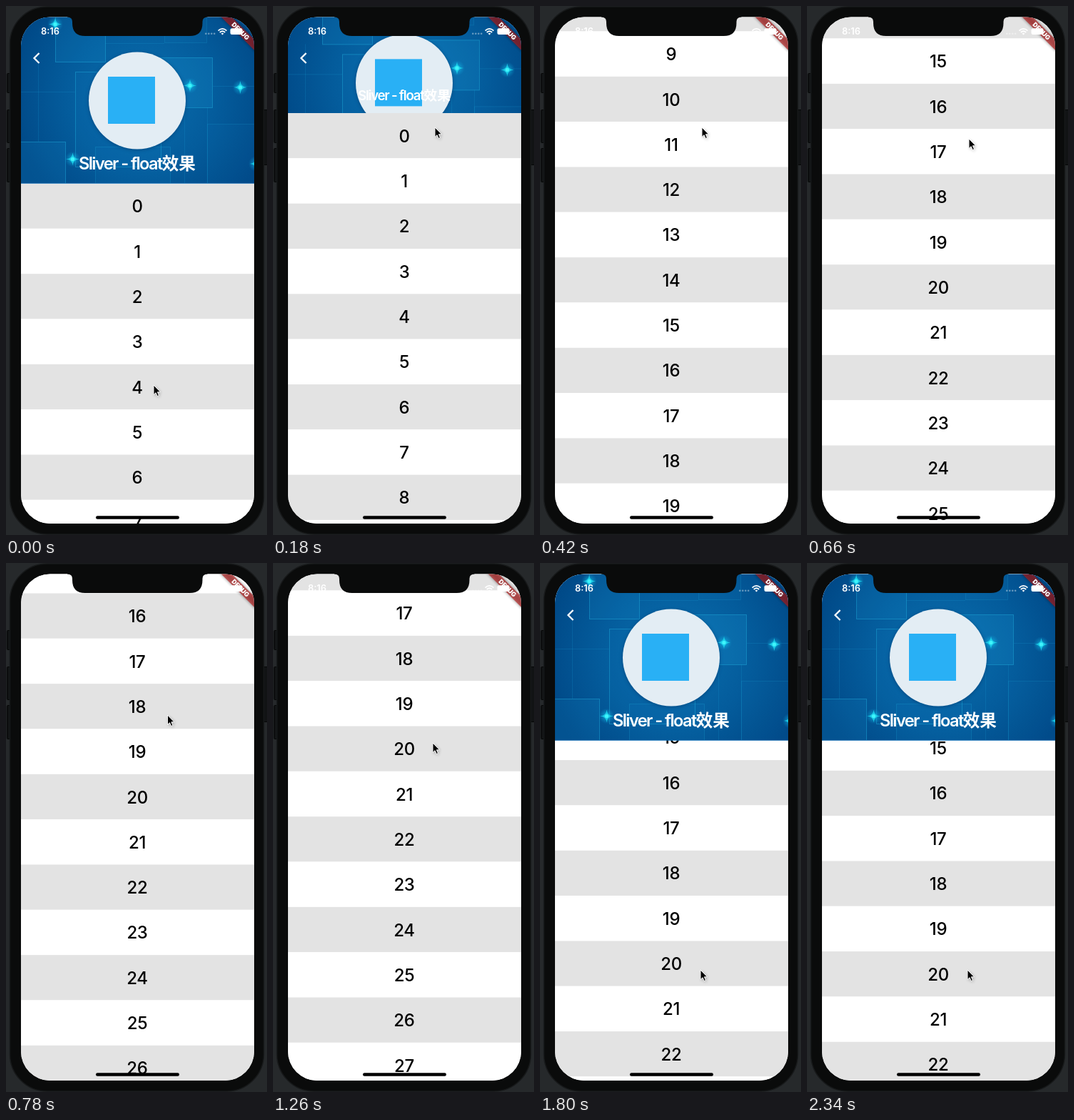
Recreate the animation shown at these times as an HTML page. Size 366 by 741 pixels, loop 2.4 s.

```html
<!DOCTYPE html>
<html lang="zh">
<head>
<meta charset="utf-8">
<title>Sliver float</title>
<style>
  html, body { margin: 0; width: 100%; height: 100%; overflow: hidden; background: #26292b; }
  svg { display: block; width: 366px; height: 741px; }
  text { font-family: Inter, "Noto Sans CJK SC", "Noto Sans CJK", sans-serif; text-anchor: middle; }
  .num { font-size: 24px; font-weight: 500; letter-spacing: -.3px; fill: #000; }
  .title { font-size: 23.6px; font-weight: 600; fill: #fff; }
  .latin { letter-spacing: -1.6px; }
  .clock { font-size: 12.8px; font-weight: 600; fill: #fff; }
  .debug { font-size: 8.9px; font-weight: 900; fill: #fff; }
</style>
</head>
<body>
<svg viewBox="0 0 366 741">
  <defs>
    <clipPath id="screen"><rect x="21" y="15.5" width="327" height="709.5" rx="41"/></clipPath>
    <clipPath id="barClip"><rect id="barRect" x="20" y="15.5" width="329" height="233"/></clipPath>
    <radialGradient id="sky" gradientUnits="userSpaceOnUse" cx="190" cy="125" r="190">
      <stop offset="0" stop-color="#0a6fae"/>
      <stop offset=".55" stop-color="#045c9c"/>
      <stop offset="1" stop-color="#004886"/>
    </radialGradient>
    <radialGradient id="glow">
      <stop offset="0" stop-color="#35f4ff" stop-opacity=".9"/>
      <stop offset=".35" stop-color="#10c8ee" stop-opacity=".45"/>
      <stop offset="1" stop-color="#10a8e0" stop-opacity="0"/>
    </radialGradient>
    <filter id="soft" x="-30%" y="-30%" width="160%" height="160%"><feGaussianBlur stdDeviation="2"/></filter>
    <g id="spark">
      <circle r="11" fill="url(#glow)"/>
      <path d="M0-9Q.6-.6 9 0Q.6.6 0 9Q-.6.6-9 0Q-.6-.6 0-9Z" fill="#1fdcf2" opacity=".8"/>
      <circle r="2.6" fill="#3ff4fb"/>
    </g>
  </defs>

  <!-- phone body -->
  <g fill="#111314" stroke="#050606">
    <rect x="1.5" y="94.5" width="8" height="27" rx="1"/>
    <rect x="1.5" y="145.5" width="8" height="46" rx="1"/>
    <rect x="1.5" y="199.5" width="8" height="47" rx="1"/>
    <rect x="357.5" y="145.5" width="10" height="77" rx="1"/>
  </g>
  <rect x="5.5" y="1" width="356" height="739" rx="52" fill="#0a0b0b" stroke="#17191a" stroke-width="1.5"/>

  <g clip-path="url(#screen)">
    <rect x="20" y="15" width="329" height="711" fill="#fff"/>
    <g id="list"></g>

    <g id="bar">
      <g clip-path="url(#barClip)">
        <rect x="20" y="15" width="329" height="234" fill="#2196f3"/>
        <g id="photo">
          <rect x="20" y="15" width="329" height="234" fill="url(#sky)"/>
          <g fill="#1c9ad6" fill-opacity=".13" stroke="#1fa6d8" stroke-opacity=".5">
            <rect x="69.5" y="5.5" width="70" height="73"/>
            <rect x="97.5" y="92.5" width="120" height="133" fill-opacity=".06"/>
            <rect x="214.5" y="72.5" width="75" height="70" fill-opacity=".2"/>
            <rect x="10.5" y="190.5" width="73" height="70"/>
            <rect x="222.5" y="5.5" width="59" height="46" fill-opacity=".05" stroke-opacity=".2"/>
            <rect x="282.5" y="165.5" width="80" height="90" fill-opacity=".04" stroke-opacity=".2"/>
            <rect x="125.5" y="197.5" width="105" height="60" fill-opacity=".06" stroke-opacity=".25"/>
          </g>
          <path d="M20 120.5H97M139 52.5H222M290 112.5H349M282.5 142V249M45.5 78V190M250.5 142V249M84 214.5H125" fill="none" stroke="#1ba0d4" stroke-opacity=".2"/>
          <use href="#spark" x="69" y="25.5"/>
          <use href="#spark" x="258" y="111.5"/>
          <use href="#spark" x="328.5" y="114"/>
          <use href="#spark" x="93.5" y="214.5"/>
          <use href="#spark" x="351" y="221"/>
          <circle cx="184" cy="133.5" r="69" fill="#003a70" opacity=".5" filter="url(#soft)"/>
          <circle cx="184" cy="132.5" r="68" fill="#e3edf4"/>
          <rect x="143" y="99" width="66" height="66" fill="#29b0f5"/>
        </g>
        <g id="title"><text class="title" y="-8"><tspan class="latin">Sliver - float</tspan><tspan>效果</tspan></text></g>
        <path d="M46.5 66L39.5 73L46.5 80" fill="none" stroke="#fff" stroke-width="2.3"/>
      </g>
    </g>

    <!-- debug ribbon -->
    <g transform="translate(348.5 15.5) rotate(45)">
      <rect x="-36" y="22.5" width="72" height="10.5" fill="#000" opacity=".45" filter="url(#soft)"/>
      <rect x="-36" y="22.5" width="72" height="10.5" fill="#b71c1c" fill-opacity=".63"/>
      <text class="debug" y="31">DEBUG</text>
    </g>

    <!-- status bar -->
    <text class="clock" x="62" y="40.3">8:16</text>
    <g fill="#fff">
      <g opacity=".4">
        <circle cx="280.3" cy="38.7" r="1.3"/><circle cx="284.3" cy="38.7" r="1.3"/>
        <circle cx="288.3" cy="38.7" r="1.3"/><circle cx="292.2" cy="38.7" r="1.3"/>
      </g>
      <g fill="none" stroke="#fff" stroke-width="1.8">
        <path d="M297.6 34.6Q303.5 29.2 309.4 34.6"/>
        <path d="M299.8 37Q303.5 33.6 307.2 37"/>
      </g>
      <path d="M301.6 38.6Q303.5 37 305.4 38.6L303.5 40.6Z"/>
      <rect x="314.5" y="31.2" width="17" height="8.8" rx="2.3"/>
      <path d="M332.6 34.2Q334.2 35.6 332.6 37Z"/>
    </g>
    <rect x="126" y="714.3" width="117" height="4.4" rx="2.2"/>
  </g>

  <path d="M86 14V15.5Q93 15.5 93 22V24Q93 42 111 42H257.5Q275.5 42 275.5 24V22Q275.5 15.5 282.5 15.5V14Z" fill="#0a0b0b"/>

  <g id="cursor">
    <path d="M1 1.5V15L4.2 12.2L6.2 17L8.5 16L6.5 11.3H10.6Z" fill="#000" opacity=".3" filter="url(#soft)"/>
    <path d="M0 0V13.5L3.1 10.7L5.2 15.5L7.5 14.5L5.4 9.8H9.6Z" fill="#000" stroke="#fff" stroke-width="1" stroke-linejoin="round"/>
  </g>
</svg>

<script>
const LOOP = 2400, STEP = 60;
const TOP = 15.5, FULL = 233, ROW = 63.33, ROWS = 30;
const COLLAPSE = 159, MAX_SCROLL = 1287;

// [ms, value...]
const DRAG_UP = [[0, 0], [60, 0], [120, 22], [180, 98.5], [240, 200], [300, 345], [360, 584], [420, 783]];
const DRAG_DOWN = [[1320, 1287], [1380, 1271], [1440, 1216], [1500, 1141], [1560, 1079.5]];
const POINTER = [
  [0, 207, 531], [60, 209, 505], [120, 219, 310], [180, 227, 170], [540, 227, 170],
  [660, 227, 186], [900, 226, 240], [1080, 224, 252], [1320, 224, 252], [1380, 224, 290],
  [1440, 224, 395], [1500, 224, 490], [1560, 224, 534], [1620, 224, 556], [1740, 225, 570]
];

const $ = id => document.getElementById(id);
const clamp = (v, lo, hi) => Math.min(hi, Math.max(lo, v));
const move = (el, x, y, extra = '') => el.setAttribute('transform', `translate(${x} ${y})${extra}`);

function track(keys, t) {
  let i = 0;
  while (i < keys.length - 2 && t > keys[i + 1][0]) i++;
  const a = keys[i], b = keys[i + 1];
  const k = clamp((t - a[0]) / (b[0] - a[0]), 0, 1);
  return a.slice(1).map((v, n) => v + (b[n + 1] - v) * k);
}

const fling = (t, start, end, travel, tau) => end - travel * Math.exp(-(t - start) / tau);

function scrollAt(t) {
  if (t <= 420) return track(DRAG_UP, t)[0];
  if (t < 1320) return Math.min(MAX_SCROLL, fling(t, 420, 1292, 509, 185));
  if (t <= 1560) return track(DRAG_DOWN, t)[0];
  return t < 2160 ? fling(t, 1560, 971, -108.5, 120) : 971;
}

let rows = '';
for (let i = 0; i < ROWS; i++) {
  const y = i * ROW;
  rows += `<rect x="20" y="${y}" width="329" height="${ROW}" fill="${i % 2 ? '#fff' : '#e3e3e3'}"/>` +
    `<text class="num" x="184" y="${y + 40.7}">${i}</text>`;
}
$('list').innerHTML = rows;

function draw(t) {
  const scroll = scrollAt(t);
  move($('list'), 0, TOP + FULL - scroll);

  // The bar floats back in as soon as the list is pulled down.
  const shown = clamp(t < 1320 ? FULL - scroll : MAX_SCROLL - scroll, 0, FULL);
  const height = Math.max(shown, FULL - COLLAPSE);
  const shrink = FULL - height, p = shrink / COLLAPSE;
  $('bar').style.display = shown > 0 ? '' : 'none';
  move($('bar'), 0, shown - height);
  $('barRect').setAttribute('height', height);
  move($('photo'), 0, -shrink / 4);
  $('photo').setAttribute('opacity', 1 - clamp((p - 0.66) / 0.34, 0, 1));
  move($('title'), 184, TOP + height - 12, ` scale(${1 - p / 3})`);

  move($('cursor'), ...track(POINTER, t));
}

const start = performance.now();
function tick() {
  const t = (performance.now() - start) % LOOP;
  draw(Math.floor(t / STEP) * STEP);
  requestAnimationFrame(tick);
}
tick();
</script>
</body>
</html>
```
